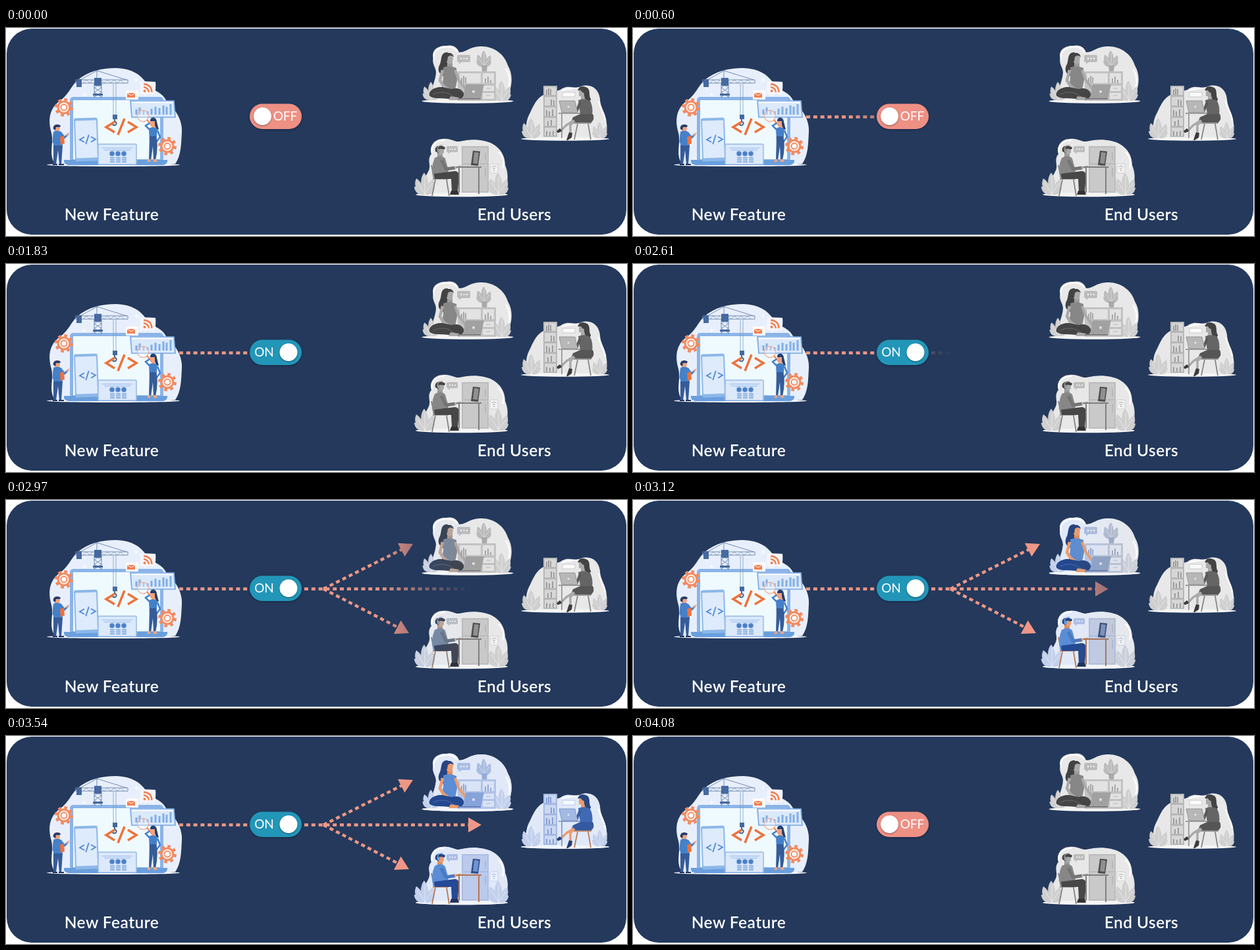
Animation of 943x317 px, one loop 4.53 s. Source, as an HTML page:

```html
<!DOCTYPE html>
<html lang="en">
<head>
<meta charset="utf-8">
<title>Feature toggle</title>
<style>
@property --x { syntax: "<length>"; inherits: false; initial-value: 0px; }
html, body { margin: 0; width: 100%; height: 100%; overflow: hidden; background: #fff; }
svg { position: absolute; left: 0; top: 0; width: 943px; height: 317px; }
text { font-family: Lato, "Open Sans", sans-serif; fill: #fff; text-anchor: middle; }
.title { font-size: 24.5px; font-weight: 600; letter-spacing: .45px; }
.state { font-size: 19px; }
.gray { filter: grayscale(1); }
.dash { fill: none; stroke: #ef9786; stroke-width: 4.4; stroke-dasharray: 6 4.8; }
.head { fill: #ef9786; }
.pill { filter: drop-shadow(0 1.5px 1.5px #0b172c90); }
.knob { fill: #fff; filter: drop-shadow(0 1px 1px #0006); }

/* soft-edged reveal from left to right */
.wipe {
  -webkit-mask-image: linear-gradient(90deg, #000 calc(var(--x) - 138px), #0000 var(--x));
  mask-image: linear-gradient(90deg, #000 calc(var(--x) - 138px), #0000 var(--x));
}
.wipe, .on, .off { animation: 4530ms -2ms infinite step-end; }
.input { animation-name: input; }
.output { animation-name: output; }
.on { animation-name: on; }
.off { animation-name: off; }
@keyframes input {
  0% { --x: 0px; }
  .6623% { --x: 0px; animation-timing-function: steps(44); }
  29.8013% { --x: 1081px; }
  90.0662%, 100% { --x: 0px; }
}
@keyframes output {
  0% { --x: 0px; }
  40.3974% { --x: 0px; animation-timing-function: steps(57); }
  78.1457% { --x: 1060px; }
  90.0662%, 100% { --x: 0px; }
}
@keyframes on {
  0%, 90.0662%, 100% { opacity: 0; }
  40.3974% { opacity: 1; }
}
@keyframes off {
  0%, 90.0662%, 100% { opacity: 1; }
  40.3974% { opacity: 0; }
}
</style>
</head>
<body>

<svg viewBox="0 0 943 317">
  <defs>
    <g id="plant">
      <path d="M0 0C-7-9-7-24-1-31C6-23 7-9 0 0Z"/>
      <path d="M-1 0C-13-4-16-14-12-23C-5-19-1-9-1 0ZM1 0C13-4 15-13 12-22C5-18 1-9 1 0Z"/>
      <path d="M-1 0C-10 1-14-4-15-11C-8-12-3-6-1 0ZM1 0C9 1 13-3 14-10C7-10 3-6 1 0Z"/>
      <path d="M0 0V-26M0-1L-10-17M0-1L10-16" fill="none" stroke="#e9effb" stroke-width=".7"/>
    </g>
    <g id="bubble">
      <path d="M2 0H18Q20 0 20 2V9Q20 11 18 11H7L3 14V11H2Q0 11 0 9V2Q0 0 2 0Z" fill="#a9bde6"/>
      <path d="M5 5.5H16" stroke="#fff" stroke-width="2" stroke-dasharray="2 2.5"/>
    </g>
    <g id="gear">
      <circle r="11.5" fill="none" stroke="#f38a5f" stroke-width="5" stroke-dasharray="4.5 4.53"/>
      <circle r="9" fill="#fdeee7" stroke="#f38a5f" stroke-width="3"/>
      <circle r="4.5" fill="#fff" stroke="#f38a5f" stroke-width="1.8"/>
    </g>
    <path id="arrow" class="head" d="M0 0L-20-11.5V11.5Z"/>

    <g id="sitter">
      <path d="M647 111C642 96 652 84 653 68C653 60 646 55 649 45C645 34 657 26 669 27C678 25 685 29 688 37C699 37 706 27 722 28C741 28 757 40 762 57C772 73 768 97 757 111Z" fill="#e1e9f9"/>
      <path d="M650 48C647 37 657 29 668 29C676 28 682 31 685 36M759 62C768 76 765 91 759 99" fill="none" stroke="#fff" stroke-width="2"/>
      <ellipse cx="701" cy="111.500" rx="69.500" ry="3.200" fill="#f1f5fc"/>
      <g fill="#c3d0ec">
        <use href="#plant" transform="translate(646 110) scale(.9)"/>
        <use href="#plant" transform="translate(753 111)"/>
        <path d="M686 66H744V111H686Z" fill="#b3c3e7"/>
        <use href="#plant" transform="translate(726 59) scale(.8)" fill="#a9bbe1"/>
      </g>
      <path d="M722 57H731L730 66H723Z" fill="#94abd9"/>
      <path d="M689 69H721V84H689ZM724 69H741V84H724ZM724 88H741V96H724ZM724 99H741V108H724Z" fill="#d9e3f6"/>
      <path d="M692 84V76M695 84V73M698 84V75M728 84V77M732 84V74M736 84V79" stroke="#91a8d8" stroke-width="2"/>
      <path d="M729 92H736M729 103H736" stroke="#a5b7df"/>
      <use href="#bubble" x="685" y="41"/>
      <path d="M670 37C659 37 662 49 659 55C655 62 656 69 664 73L677 64L678 43Z" fill="#27457f"/>
      <path d="M670 51L678 50V61H670Z" fill="#e18c59"/>
      <path d="M668 43Q674 37 679 44L678 53Q674 57 669 52Z" fill="#ed9c6c"/>
      <path d="M680 44C678 36 667 36 664 45C661 53 667 57 670 50L671 44Q675 40 680 44Z" fill="#27457f"/>
      <path d="M664 60Q674 56 684 61L685 80L682 94H661L664 77Z" fill="#5a8dd6"/>
      <path d="M663 64L659 80L664 88L677 98" fill="none" stroke="#ed9c6c" stroke-width="4.500" stroke-linejoin="round"/>
      <path d="M682 64L688 80L698 93" fill="none" stroke="#ed9c6c" stroke-width="4"/>
      <path d="M662 90C651 89 641 96 643 103C648 110 668 105 680 110C690 111 697 105 695 99C691 92 684 91 677 93Z" fill="#24488f"/>
      <path d="M648 101Q667 93 681 105" fill="none" stroke="#496caa"/>
      <path d="M675 104L688 106L687 110H672Z" fill="#ed9c6c"/>
      <path d="M698 86H726L721 108H694Z" fill="#86a3d9"/>
      <path d="M686 107H721V109H686Z" fill="#647fbd"/>
      <circle cx="710" cy="97" r="2" fill="#dce5f6"/>
    </g>

    <g id="desk">
      <path d="M797 169C787 157 789 141 796 129C801 118 806 106 818 101C829 94 838 98 845 92C856 86 864 94 873 89C889 84 900 93 902 108C902 120 911 130 912 145C914 156 910 163 905 169Z" fill="#e1e9f9"/>
      <path d="M900 111C901 122 909 129 910 141M844 95C858 91 860 93 872 91" fill="none" stroke="#fff" stroke-width="2"/>
      <ellipse cx="849" cy="169" rx="67" ry="2.800" fill="#f1f5fc"/>
      <g fill="#c3d0ec">
        <use href="#plant" transform="translate(798 168)"/>
        <use href="#plant" transform="translate(902 168) scale(.8)"/>
      </g>
      <path d="M816 88H837V166H816Z" fill="#a3b8e2"/>
      <path d="M818 90H835V102H818ZM818 105H835V118H818ZM818 121H835V134H818ZM818 137H835V149H818ZM818 152H835V164H818Z" fill="#cbd8f1"/>
      <path d="M821 102V94M824 102V92M827 102V93M832 118V110M828 118V109M821 134V125M825 134V127M830 134V124M823 149V142M828 149V140M821 164V157M826 164V158M831 164V157" stroke="#86a0d5" stroke-width="2"/>
      <path d="M845 98H864V105H845Z" fill="#f7faff" stroke="#bdcbe9"/>
      <path d="M870 96C867 91 874 87 880 90C889 92 884 103 888 108C889 112 881 114 876 109Z" fill="#27457f"/>
      <path d="M870 95H878V103L880 110H873V104H870Z" fill="#ed9c6c"/>
      <path d="M868 95Q871 89 879 91L881 101Q874 98 873 95Z" fill="#27457f"/>
      <path d="M869 110Q879 106 887 111Q892 121 890 132H872Z" fill="#3f69b3"/>
      <path d="M872 113L867 126L857 127" fill="none" stroke="#365c9f" stroke-width="4" stroke-linejoin="round"/>
      <path d="M862 145H888M868 146L863 170M884 146L888 170M888 145L891 132" fill="none" stroke="#bd7751" stroke-width="1.700"/>
      <path d="M872 131H891Q895 140 888 144H866L858 143L861 136Z" fill="#34599f"/>
      <path d="M863 141L857 148L857 163M862 141L851 148L842 157" fill="none" stroke="#ed9c6c" stroke-width="3.500" stroke-linejoin="round"/>
      <path d="M855 159L860 160L859 167L853 171H851ZM841 153L845 157L838 160L836 157Z" fill="#243c70"/>
      <path d="M840 111H864L868 129H844Z" fill="#a3b9e2" stroke="#7c97cf"/>
      <path d="M839 130H872M844 131V168" stroke="#7189bd" stroke-width="1.500"/>
      <circle cx="854" cy="120" r="1.500" fill="#e4ebf8"/>
    </g>

    <g id="coder">
      <path d="M634 254C625 242 636 230 641 219C647 209 638 202 646 192C642 180 651 169 663 169C674 167 682 174 688 173C701 170 713 169 726 172C746 176 758 191 758 209C764 223 763 241 753 254Z" fill="#e1e9f9"/>
      <path d="M647 190C645 177 655 171 666 171M748 189C757 198 756 207 754 214" fill="none" stroke="#fff" stroke-width="2"/>
      <ellipse cx="692" cy="254" rx="70" ry="3.200" fill="#f1f5fc"/>
      <g fill="#c3d0ec">
        <use href="#plant" transform="translate(636 254) scale(1.08)"/>
        <use href="#plant" transform="translate(748 254) scale(1.08)"/>
      </g>
      <path d="M692 180H733V251H692Z" fill="#acbde4"/>
      <path d="M694 182H731V206H694ZM694 208H731V249H694Z" fill="#bccaeb"/>
      <path d="M728 190V202M728 213V227" stroke="#94a9d8"/>
      <path d="M735 207H747V221H735Z" fill="#eef3fc" stroke="#c3d0ed"/>
      <path d="M737.500 212Q741 208.500 744.500 212M739 214.500Q741 212 743 214.500" fill="none" stroke="#91abdd"/>
      <circle cx="741" cy="217" r="1" fill="#91abdd"/>
      <use href="#bubble" transform="translate(669 180) scale(.85)"/>
      <path d="M655 189H663V197H655Z" fill="#e18c59"/>
      <path d="M654 182H665V190Q661 195 656 191Z" fill="#ed9c6c"/>
      <path d="M652 188C650 180 658 177 667 182L666 185L659 184L657 191Z" fill="#27457f"/>
      <path d="M655 186Q655 178 663 179" fill="none" stroke="#6f9ee0" stroke-width="1.500"/>
      <ellipse cx="657" cy="187" rx="2.200" ry="3" fill="#6f9ee0"/>
      <path d="M648 230H672M652 231L647 256M669 231L673 256M650 229L646 209" fill="none" stroke="#b8734e" stroke-width="1.700"/>
      <path d="M651 198Q661 192 667 199L672 217L668 229H649Q644 214 651 198Z" fill="#5a8dd6"/>
      <path d="M661 201L668 215L682 213" fill="none" stroke="#4a79c4" stroke-width="5" stroke-linejoin="round"/>
      <path d="M681 213L691 211" stroke="#ed9c6c" stroke-width="3"/>
      <path d="M650 222L682 218Q688 219 688 225L686 249H677L676 230L651 230Z" fill="#244a96"/>
      <path d="M676 248H686L688 254H674Z" fill="#1f3462"/>
      <path d="M684 212H722M688 213V251M718 213V253" fill="none" stroke="#b8734e" stroke-width="2"/>
      <path d="M709 187L720 188L717 210L706 209Z" fill="#304e8c"/>
      <path d="M711 189L718 190L716 207L709 206Z" fill="#6e93d3"/>
    </g>
    <g id="users"><use href="#sitter"/><use href="#desk"/><use href="#coder"/></g>
  </defs>

  <rect x="1" y="1" width="941" height="314" rx="38" fill="#24395c"/>
  <text class="title" x="160.500" y="292.500">New Feature</text>
  <text class="title" x="772" y="292.500">End Users</text>

  <g id="feature">
    <path d="M74 207C64 190 73 178 69 160C63 140 66 122 82 111C96 100 98 90 108 80C124 66 145 61 168 61C190 62 204 70 213 84C220 95 236 96 243 110C255 122 268 138 267 158C266 178 266 194 257 207Z" fill="#e8effc"/>
    <ellipse cx="163" cy="208.500" rx="101" ry="2.500" fill="#f4f7fd"/>
    <path d="M119 98V104M116 101H122M198 76V82M195 79H201M238 155V161M235 158H241" stroke="#fff"/>
    <rect x="97" y="105" width="142" height="99" rx="5" fill="#8ab4e8"/>
    <path d="M102 110H234V200H102Z" fill="#effaff"/>
    <path d="M88 201H245V204Q243 209 237 209H95Q89 208 88 204Z" fill="#6a9fde"/>
    <g fill="none" stroke="#5673a0">
      <path d="M105 79H185V84H106ZM113 79L138 65L183 79M138 65V80" stroke-width=".8"/>
      <path d="M117 84L122 79L127 84L132 79M144 79L149 84L154 79L159 84L164 79L169 84L174 79L179 84" stroke-width=".6"/>
      <path d="M134 84V106M145 84V106M134 84L145 91L134 98L145 105M145 84L134 91L145 98L134 105" stroke-width=".8"/>
      <path d="M163 85V137M167 85V137" stroke="#7d9cc6" stroke-width=".8"/>
    </g>
    <path d="M107 78H115V90H107ZM134 76H145V88H134ZM132 100H147V103H132ZM162 132H169V139H162Z" fill="#46699f"/>
    <path d="M165 139V142Q170 145 166 148Q162 149 161 145" fill="none" stroke="#4c6489" stroke-width="2"/>
    <path d="M165 143L152 151L165 159M180 138L170 163M185 143L198 151L185 159" fill="none" stroke="#f0713c" stroke-width="3.500"/>
    <use href="#gear" x="88" y="121"/>
    <use href="#gear" x="245" y="180"/>
    <g transform="rotate(-2 120 170)">
      <rect x="104" y="137" width="36" height="66" rx="3" fill="#8db7ea"/>
      <path d="M106 141H138V198H106Z" fill="#deebfc"/>
      <path d="M119 166L112 170L119 174M126 163L121 177M129 166L136 170L129 174" fill="none" stroke="#4d88d4" stroke-width="1.800"/>
    </g>
    <rect x="140" y="177" width="58" height="31" rx="1" fill="#dce9fb" stroke="#97bbe9" stroke-width="1.500"/>
    <path d="M146 183H192M149 186H189" stroke="#94b8e8"/>
    <path d="M158 198H165M167 198H174M176 198H183M158 201H165M167 201H174M176 201H183M158 204H165M167 204H174M176 204H183" stroke="#6f9ad4" stroke-width="1.500"/>
    <g fill="#4c7fc5" stroke="#a8c7ed">
      <circle cx="161" cy="191.500" r="4"/><circle cx="170" cy="191.500" r="4"/><circle cx="179" cy="191.500" r="4"/>
    </g>
    <rect x="182" y="95" width="19" height="14" rx="1" fill="#fdf9f8"/>
    <path d="M184 99H196V106H184Z" fill="#f0804f"/>
    <path d="M184 99L190 103L196 99" fill="none" stroke="#fff"/>
    <path d="M204 81L227 82Q228 90 226 101H214L210 105V101H203Z" fill="#f4f6fd"/>
    <path d="M209 90Q216 91 217 98M209 85.500Q221 86 221.500 98" fill="none" stroke="#f0804f" stroke-width="2.300"/>
    <circle cx="210.500" cy="96" r="2" fill="#f0804f"/>
    <path d="M189 111H255L257 136H191Z" fill="#dbe9fb" stroke="#79a8e4" stroke-width="1.700"/>
    <path d="M191 113.500H254" stroke="#fff" stroke-width="1.500"/>
    <path d="M198 132V124M203 132V121M209 132V125M215 132V127M221 132V123M227 132V120M233 132V122M239 132V118M244 132V120M250 132V116" stroke="#82aee6" stroke-width="3"/>
    <circle cx="208" cy="134" r="8.500" fill="#fff5" stroke="#eeb19e" stroke-width="1.300"/>
    <path d="M214 140L220 147" stroke="#f0804f" stroke-width="2"/>
    <path d="M73 150Q72 147 77 147Q82 147 82 152L81 158H75Z" fill="#f3a37f"/>
    <path d="M72 154C70 147 80 145 83 149L82 151L76 151L75 156Z" fill="#263f70"/>
    <path d="M72 158Q79 155 85 159L86 180H72Z" fill="#4580c8"/>
    <path d="M84 161L89 167L94 162M73 161L72 174L82 176" fill="none" stroke="#4580c8" stroke-width="3" stroke-linejoin="round"/>
    <path d="M92 164L96 160" stroke="#f3a37f" stroke-width="2"/>
    <path d="M82 166L88 164L89 176L83 178Z" fill="#f0713c"/>
    <path d="M72 179H86L84 208H81L79 186L76 208H72Z" fill="#355b99"/>
    <path d="M71 207H78V209H71ZM80 207H88V209H80Z" fill="#1d335d"/>
    <path d="M219 140C221 134 229 136 229 143L232 155L224 153L219 147Z" fill="#263f70"/>
    <path d="M219 142H226V148L228 153H221V148H219Z" fill="#f3a37f"/>
    <path d="M217 153Q224 149 230 154L228 174H218Z" fill="#4580c8"/>
    <path d="M218 155L212 149L218 145M230 156L234 166L228 174" fill="none" stroke="#4580c8" stroke-width="2.500"/>
    <path d="M218 165H228Q232 179 227 202H224L223 180L220 202H217Z" fill="#355b99"/>
    <path d="M216 200H220L219 204H214ZM224 200H228L230 204H224Z" fill="#f3a37f"/>
  </g>
  <use href="#users" class="gray"/>
</svg>

<svg class="wipe input" viewBox="0 0 943 317">
  <path class="dash" d="M263 135.500H371"/>
</svg>

<svg class="wipe output" viewBox="0 0 943 317">
  <use href="#users"/>
  <path class="dash" d="M453 135.500H704"/>
  <path class="dash" d="M482 135.500L601 75.500"/>
  <path class="dash" d="M482 135.500L595 194"/>
  <use href="#arrow" transform="translate(722 135.500)"/>
  <use href="#arrow" transform="translate(618 67) rotate(-27)"/>
  <use href="#arrow" transform="translate(612 203) rotate(27.500)"/>
</svg>

<svg viewBox="0 0 943 317">
  <g class="off">
    <rect class="pill" x="370" y="115.500" width="79" height="38.500" rx="19.250" fill="#ee9084"/>
    <circle class="knob" cx="389.500" cy="134.500" r="13.500"/>
    <text class="state" x="424" y="141">OFF</text>
  </g>
  <g class="on">
    <rect class="pill" x="370" y="115.500" width="79" height="38.500" rx="19.250" fill="#2296b8"/>
    <circle class="knob" cx="429" cy="134.500" r="13.500"/>
    <text class="state" x="392" y="141">ON</text>
  </g>
</svg>

</body>
</html>
```
